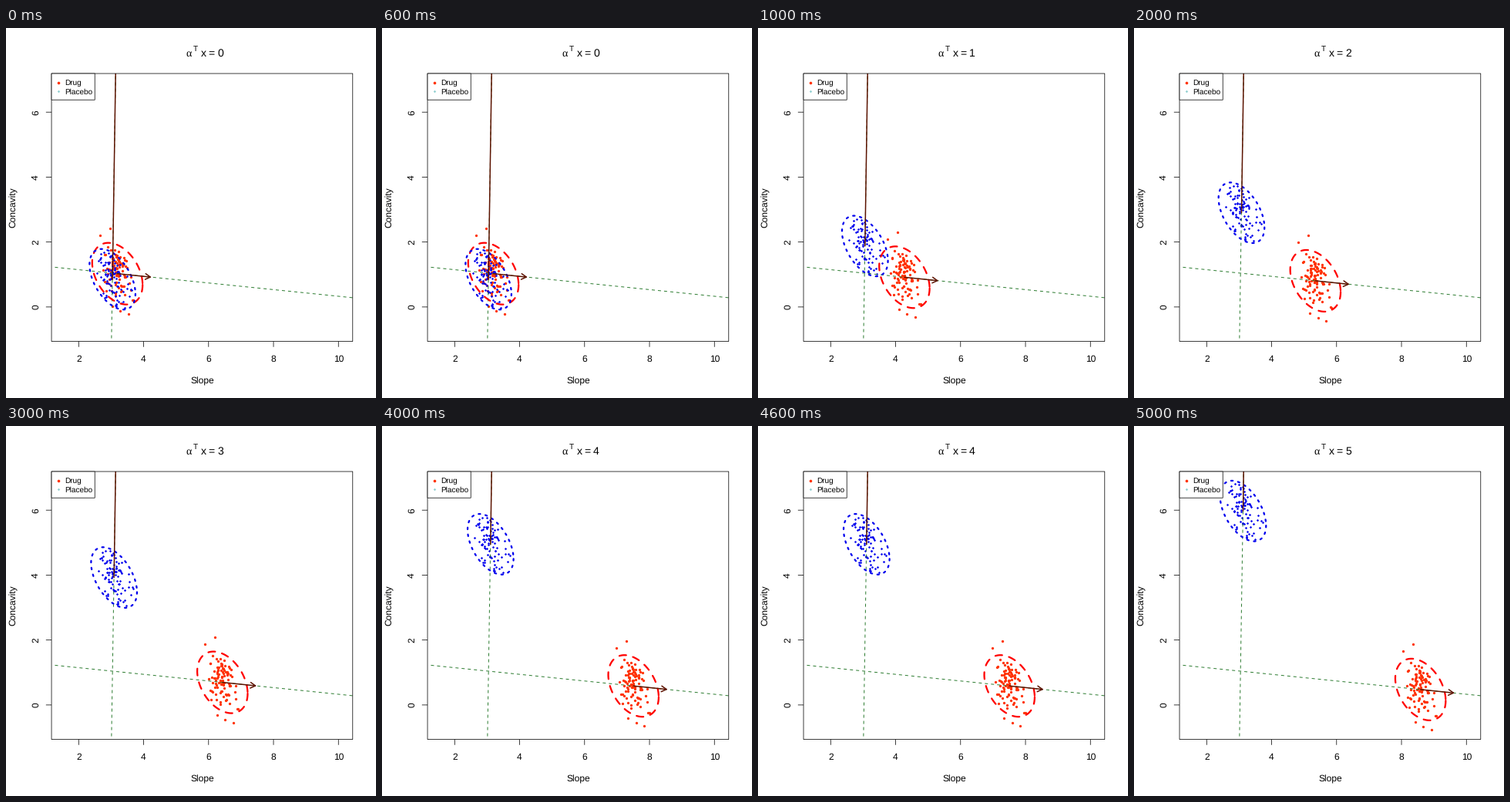
Recreate the animation shown at these times as a matplotlib script. Size 480 by 480 pixels, loop 6 s.

```python
import numpy as np
import matplotlib.pyplot as plt
from matplotlib.animation import FuncAnimation
from matplotlib.patches import Rectangle

SIZE, DPI = 480, 100
PX = 72 / DPI                       # points per pixel
FRAMES, STEP_MS = 6, 1000
LEFT, RIGHT, TOP, BOTTOM = 59.04, 449.76, 59.04, 406.56
UNIT = 42.12                        # pixels per data unit
THIN = 0.75
RED, BLUE, GREEN, BROWN = "#ff0000", "#0000ee", "#2e7d32", "#5c1200"
DRUG_DOT, PLACEBO_DOT = "#ff3000", "#8fcfd0"

plt.rcParams["text.hinting"] = "none"
plt.rcParams["text.hinting_factor"] = 1


class Group:
    """A cloud of points with its ellipse, moving by a fixed step."""

    def __init__(self, start, step, half, tilt, spread, seed, strays=()):
        self.start, self.step = np.array(start), np.array(step)
        t = np.linspace(0, 2 * np.pi, 241)
        self.ring = np.column_stack([half[0] * np.cos(t),
                                     half[1] * np.cos(t - np.arccos(tilt))])
        rng = np.random.default_rng(seed)
        u, v = rng.normal(size=(2, 400))
        x = spread[0] * u
        y = spread[1] * (tilt * u + np.sqrt(1 - tilt ** 2) * v)
        a, b = x / half[0], y / half[1]
        inside = a * a - 2 * tilt * a * b + b * b < 0.9 * (1 - tilt ** 2)
        core = np.column_stack([x, y])[inside][:95]
        self.points = np.vstack([core, *strays])

    def center(self, i):
        return self.start + i * self.step


drug = Group((144.5, 318.7), (45.43, 4.63), (32.7, 40.0), 0.36, (8.5, 20), 4,
             [(-9.3, -58.5), (-22.3, -49.5), (-7, 42), (3.5, 48), (14, 52)])
plac = Group((138.1, 326.0), (0.68, -43.15), (29.8, 39.3), 0.48, (10, 21), 9)

fig = plt.figure(figsize=(SIZE / DPI, SIZE / DPI), dpi=DPI, facecolor="white")
ax = fig.add_axes([0, 0, 1, 1])
ax.set_xlim(0, SIZE)
ax.set_ylim(SIZE, 0)
ax.axis("off")


def box(w, h, z, fill):
    patch = Rectangle((LEFT, TOP), w, h, fc=fill, ec="black", lw=THIN * PX,
                      zorder=z, snap=False)
    return ax.add_patch(patch)


frame_box = box(RIGHT - LEFT, BOTTOM - TOP, 8, "none")


def line(xs, ys, color, width, z, dash=None, clip=True, cap="round", shift=0):
    style = dict(color=color, lw=width * PX, zorder=z, snap=False)
    if dash:
        style.update(linestyle=(shift / width, [d / width for d in dash]),
                     dash_capstyle=cap)
    else:
        style.update(solid_capstyle=cap)
    art, = ax.plot(xs, ys, **style)
    if clip:
        art.set_clip_path(frame_box)
    return art


def dots(color, marker, size, z, xs=(), ys=()):
    art, = ax.plot(xs, ys, linestyle="none", marker=marker, ms=size * PX,
                   color=color, mew=0, zorder=z)
    return art


def label(x, y, s, px=12, ha="center", turn=0, family="Liberation Sans"):
    return ax.text(x, y, s, fontsize=px * PX, family=family, ha=ha, va="baseline",
                   rotation=turn, rotation_mode="anchor", color="black", zorder=10)


# axes
for v in range(2, 11, 2):
    x = 94.3 + (v - 2) * UNIT
    line([x, x], [BOTTOM, BOTTOM + 7.2], "black", THIN, 8, clip=False, cap="butt")
    label(x, 433, v)
for v in range(0, 7, 2):
    y = 361.9 - v * UNIT
    line([LEFT - 7.2, LEFT], [y, y], "black", THIN, 8, clip=False, cap="butt")
    label(42, y, v, turn=90)
label(254.4, 462, "Slope")
label(13, 232.8, "Concavity", turn=90)

# title
label(233.6, 37, "α", 14.4, "left", family="Liberation Serif")
label(243, 30.5, "T", 10, "left")
label(253, 37, "x", 14.4, "left")
label(262.7, 37, "=", 14.4, "left")
digit = label(274, 37, "0", 14.4, "left")

# legend
box(56.2, 34.2, 9, "white")
dots(DRUG_DOT, "o", 3.6, 10, [67.7], [70.5])
dots(PLACEBO_DOT, "D", 2.4, 10, [67.7], [82])
label(76, 74, "Drug", 9.6, "left")
label(76, 85.5, "Placebo", 9.6, "left")

# guide lines
line([63.5, RIGHT], [310.4, 349.9], GREEN, 1, 4, (4, 4), cap="butt")
line([136.8, 142.2], [BOTTOM, TOP], GREEN, 1, 4, (4, 4), cap="butt", shift=4)

drug_dots = dots(DRUG_DOT, "o", 3.3, 2)
plac_dots = dots(BLUE, "D", 2.3, 3)
drug_ring = line([], [], RED, 2.25, 5, (9, 9))
plac_ring = line([], [], BLUE, 2.25, 5, (2.25, 6.75))
shaft, head, pole = (line([], [], BROWN, 1.5, 6) for _ in range(3))


def place(art, pts):
    art.set_data(*np.transpose(pts))


def draw(i):
    for group, points, ring in ((drug, drug_dots, drug_ring),
                                (plac, plac_dots, plac_ring)):
        place(points, group.points + group.center(i))
        place(ring, group.ring + group.center(i))

    base = drug.center(i)
    reach = np.array([42.8, 4.4])
    tip = base + reach
    place(shaft, [base, tip])
    angle = np.arctan2(reach[1], reach[0])
    barbs = [tip - 7.5 * np.array([np.cos(a), np.sin(a)])
             for a in (angle - np.pi / 6, angle + np.pi / 6)]
    place(head, [barbs[0], tip, barbs[1]])

    place(pole, [plac.center(i), (142.2, TOP)])
    digit.set_text(str(i))
    return ()


anim = FuncAnimation(fig, draw, frames=FRAMES, interval=STEP_MS, repeat=True,
                     repeat_delay=0, init_func=lambda: draw(0), blit=False)
plt.show()
```
